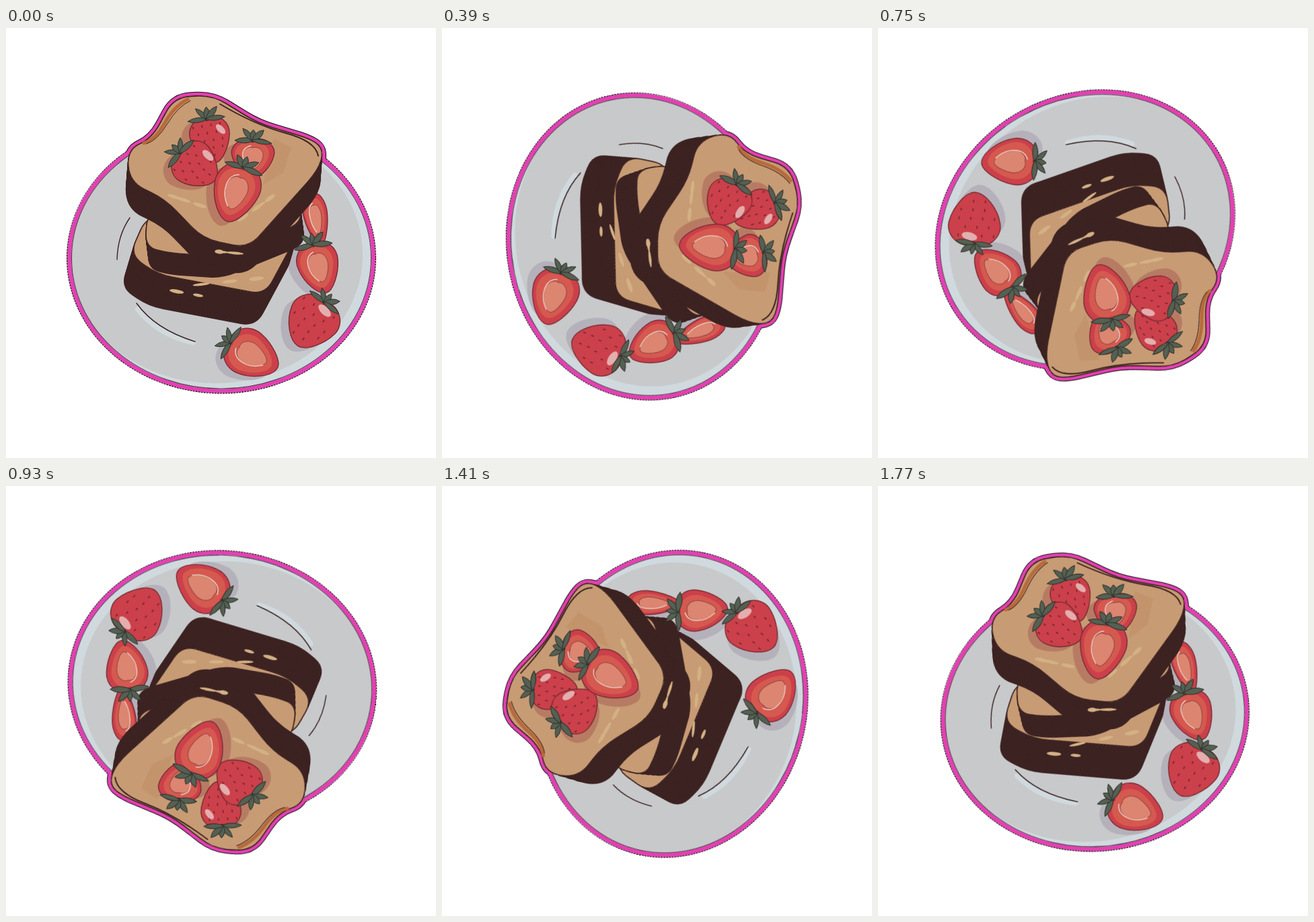
Write an HTML page that moves like this. It is 639 px wide and 639 px high and loops after 1800 ms.

```html
<!DOCTYPE html>
<html lang="en">
<head>
<meta charset="utf-8">
<title>Spinning toast plate</title>
<style>
html, body { margin: 0; width: 100%; height: 100%; overflow: hidden; background: #fff; }
svg { display: block; width: 100vw; height: 100vh; }
#plate { transform-origin: 319.5px 319.5px; }
path { stroke-linecap: round; stroke-linejoin: round; vector-effect: non-scaling-stroke; }
</style>
</head>
<body>
<svg viewBox="0 0 639 639"><g id="plate"></g></svg>
<script>
const NS = 'http://www.w3.org/2000/svg';
const plate = document.getElementById('plate');
const INK = '#3c2322', PINK = '#e340b2', RED = '#cb404a', FLESH = '#d5594f', CORE = '#dc8571';
const TAN = '#c79b74', SIDE = '#b96a39', MID = '#c07d4e', GLAZE = '#d3b184', LEAF = '#556052';
const DISH = '#c8c9cb', RIM = '#d0dade', SHADE = '#b5b1ba', STAIN = '#b77b63', BLUSH = '#e3aeae';

let seed = 7;
const rnd = () => (seed = seed * 16807 % 2147483647) / 2147483647;

function add(tag, attrs, parent = plate) {
  const el = document.createElementNS(NS, tag);
  for (const k in attrs) el.setAttribute(k, attrs[k]);
  parent.append(el);
  return el;
}
const draw = (d, fill, stroke = 'none', width = 1.3, parent = plate, more = {}) =>
  add('path', { d, fill, stroke, 'stroke-width': width, ...more }, parent);
const oval = (cx, cy, rx, ry, fill, more = {}, parent = plate) =>
  add('ellipse', { cx, cy, rx, ry, fill, ...more }, parent);

// Polygon with rounded corners from "x,y x,y ..."
function rounded(text, r) {
  const p = text.split(' ').map(s => s.split(',').map(Number));
  const toward = (a, b) => {
    const t = Math.min(.5, r / Math.hypot(b[0] - a[0], b[1] - a[1]));
    return a.map((v, k) => v + (b[k] - v) * t);
  };
  return p.map((c, i) => {
    const before = p[(i + p.length - 1) % p.length], after = p[(i + 1) % p.length];
    return `${i ? 'L' : 'M'}${toward(c, before)}Q${c} ${toward(c, after)}`;
  }).join('') + 'Z';
}

// Each slice is a face pushed down along (dx, dy)
const top3 = { face: rounded('180,181 217,164 250,103 307,100 375,142 456,166 472,182 464,211 360,327 293,313 236,254 184,229', 24), dx: -3, dy: 40, band: .5 };
const mid2 = { face: rounded('210,275 207,325 240,334 318,339 438,290 438,262', 20), dx: 4, dy: 32, band: 1 };
const low1 = { face: rounded('209,280 184,337 226,366 385,396 442,290', 22), dx: -14, dy: 47, band: .35 };

function layers(slice, paint, parent = plate) {
  for (let i = 24; i >= 0; i--) {
    const t = i / 24;
    draw(slice.face, ...paint(t), parent, { transform: `translate(${slice.dx * t} ${slice.dy * t})` });
  }
}
const solid = (slice, color, width = 0) => layers(slice, () => [color, width ? color : 'none', width]);

function bread(slice) {
  solid(slice, INK, 2);
  layers(slice, t => [t > slice.band ? SIDE : MID]);
  draw(slice.face, TAN, INK);
}

function shadow(slice, x, y) {
  const g = add('g', { transform: `translate(${x} ${y})` });
  layers(slice, () => [SHADE], g);
}

// Shiny flakes scattered along a line
function glaze(x1, y1, x2, y2, n) {
  const tilt = Math.atan2(y2 - y1, x2 - x1) * 180 / Math.PI;
  for (let i = 0; i < n; i++) {
    const t = (i + rnd()) / n, x = x1 + (x2 - x1) * t, y = y1 + (y2 - y1) * t;
    oval(x, y, 6 + 7 * rnd(), 1.5 + 2 * rnd(), GLAZE, { transform: `rotate(${tilt} ${x} ${y})` });
  }
}

// Unit berry: stalk up, tip down
const BERRY = 'M0-.95C.6-1.1 1.1-.6 .97-.1C.85 .4 .4 1 .05 1C-.35 1-.85 .45-.97-.1C-1.1-.6-.6-1.1 0-.95Z';

const place = b => ({ transform: `translate(${b.x} ${b.y}) rotate(${b.turn}) scale(${b.w} ${b.h})` });

function berryShadow(b, color) {
  draw(BERRY, color, 'none', 0, plate, place({ ...b, x: b.x - 12, y: b.y + 6 }));
}

function berry(b) {
  const g = add('g', place(b));
  draw(BERRY, RED, '#762b32', 1.4, g);
  if (b.cut) {
    draw(BERRY, FLESH, 'none', 0, g, { transform: 'translate(-.04 -.02) scale(.8)' });
    draw(BERRY, CORE, '#8d4543', 1, g, { transform: 'scale(.48 .56)' });
    draw('M-.1-.62C-.6-.5-.6 .1-.15 .5', 'none', '#ecc9bd', 1.6, g);
  } else {
    for (let row = 0; row < 5; row++) {
      const y = -.65 + row * .32, half = .75 - Math.max(0, y) * .6;
      for (let x = -half + (row % 2) * .2; x < half; x += .45) draw(`M${x} ${y}v.07`, 'none', '#742632', 1.7, g);
    }
    const x = b.x + b.w * .5, y = b.y - b.h * .45;
    oval(x, y, b.w * .3, b.w * .15, BLUSH, { transform: `rotate(45 ${x} ${y})` });
  }
  if (!b.bare) leaves(b);
}

function leaves(b) {
  const g = add('g', { transform: `translate(${b.x} ${b.y}) rotate(${b.turn}) translate(0 ${-b.h * .9})` });
  for (let i = 0; i < 5; i++) {
    const len = 15 + 12 * Math.abs(i - 2) / 2 + 3 * rnd(), w = 7 + 2 * rnd();
    draw(`M0 3Q${w} ${-len / 2} 0 ${-len}Q${-w} ${-len / 2} 0 3Z`, LEAF, '#2d302c', 1, g,
      { transform: `rotate(${(i - 2) * 46 + 8 * rnd()})` });
  }
}

const onToast = [
  { x: 304, y: 166, w: 30, h: 35, turn: -10 },
  { x: 367, y: 193, w: 32, h: 29, turn: 0, cut: true },
  { x: 283, y: 205, w: 34, h: 35, turn: -50 },
  { x: 341, y: 245, w: 35, h: 44, turn: 18, cut: true }
];
const onDish = [
  { x: 461, y: 284, w: 18, h: 39, turn: -10, cut: true, bare: true },
  { x: 465, y: 356, w: 31, h: 39, turn: -14, cut: true },
  { x: 454, y: 438, w: 39, h: 40, turn: 33 },
  { x: 366, y: 486, w: 35, h: 42, turn: -60, cut: true }
];

function dish() {
  const ring = { stroke: '#111', 'stroke-width': 8, 'stroke-dasharray': '3 1' };
  oval(320, 342, 226, 197.5, 'none', ring);
  solid(top3, '#111', 13);
  solid(top3, PINK, 11);
  oval(320, 342, 226, 197.5, RIM);
  oval(311, 337, 219, 191, DISH);
  oval(320, 342, 226, 197.5, 'none', { stroke: PINK, 'stroke-width': 6 });
  oval(320, 342, 222.5, 194, 'none', { stroke: '#55434f', 'stroke-width': 1.1 });
  draw('M196 418Q226 456 278 467', 'none', RIM, 8);
  draw('M194 409Q222 448 281 466', 'none', INK, 1.5);
}

function toast() {
  shadow(top3, -19, 32);
  shadow(low1, -21, -3);
  draw('M184 282Q166 308 165 344', 'none', INK, 1.4);
  bread(low1);
  glaze(290, 381, 396, 370, 3);
  glaze(240, 389, 290, 398, 2);
  bread(mid2);
}

function topToast() {
  bread(top3);
  draw('M205 171Q222 166 236 141T270 106', 'none', SIDE, 5);
  draw('M209 172Q225 167 240 142T274 108', 'none', INK, 1);
  draw('M318 113Q370 144 415 156T464 190', 'none', INK, 2);
  draw('M398 164L424 178L412 215L382 233Z', '#c3946c');
  glaze(244, 249, 290, 264, 3);
  glaze(345, 287, 402, 246, 4);
  glaze(300, 331, 358, 336, 3);
}

dish();
onDish.forEach(b => berryShadow(b, SHADE));
toast();
onDish.forEach(berry);
topToast();
onToast.forEach(b => berryShadow(b, STAIN));
onToast.forEach(berry);

// One turn in 60 held steps; the tiny offset keeps step edges stable
plate.animate(
  [{ transform: 'rotate(0deg)' }, { transform: 'rotate(360deg)' }],
  { duration: 1800, iterations: Infinity, easing: 'steps(60)', iterationStart: .0005 }
);
</script>
</body>
</html>
```
